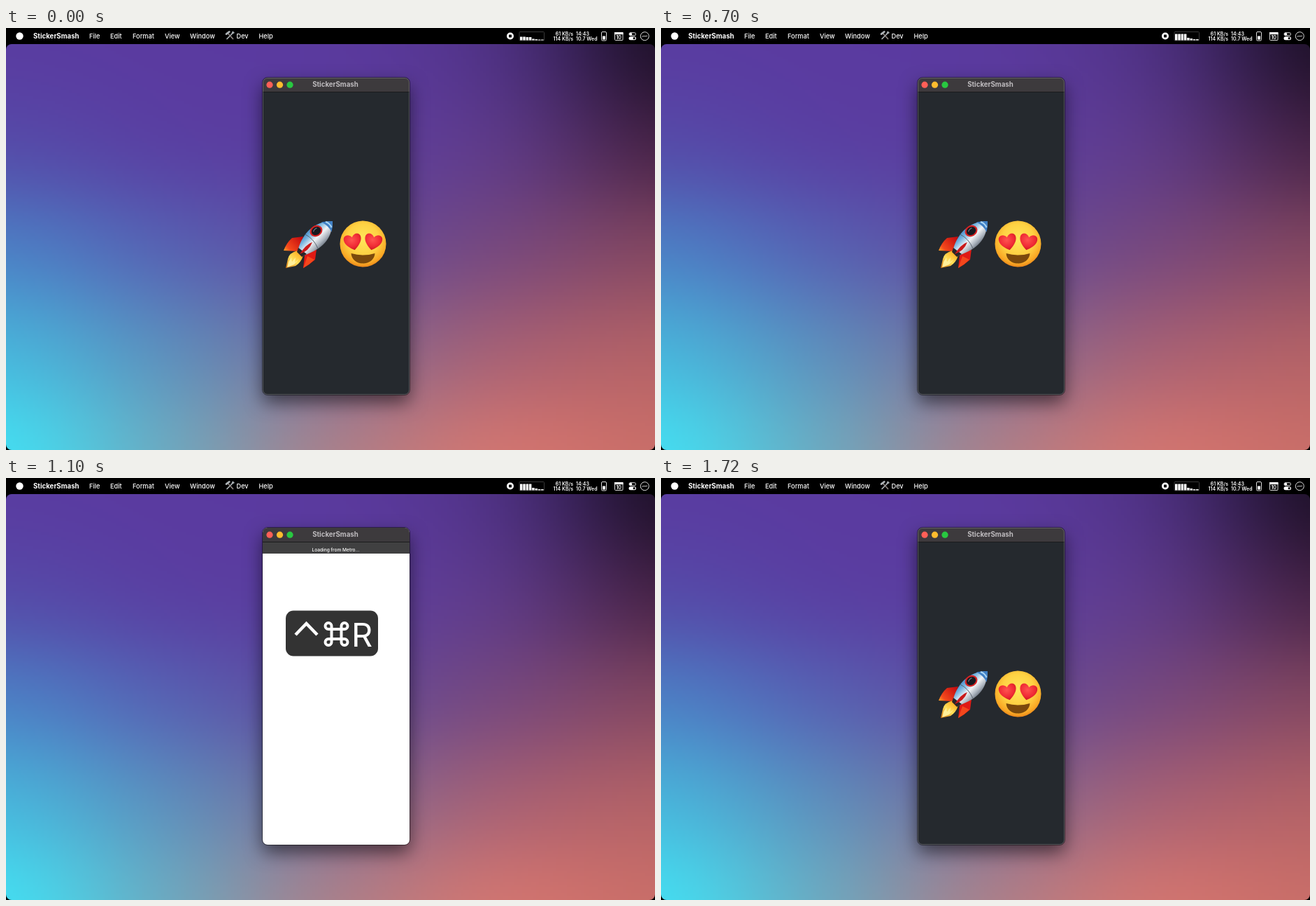
Write an HTML page with a canvas that moves like this. It is 928 px wide and 603 px high and loops after 1850 ms.

```html
<!DOCTYPE html>
<html lang="en">
<head>
<meta charset="utf-8">
<title>App reload</title>
<style>
  html, body { margin: 0; width: 100%; height: 100%; overflow: hidden; background: #000; }
  canvas { position: absolute; left: 0; top: 23px; width: 928px; height: 580px; border-radius: 8px; }
  svg { position: absolute; left: 0; top: 0; display: block; }
  text { font-family: Inter, Roboto, sans-serif; fill: #fff; }
  .menu text { font-size: 9.2px; font-weight: 500; }
  .menu .app { font-size: 9.7px; font-weight: 700; }
  .menu .stat { font-size: 7px; font-weight: 600; }
  #window { filter: drop-shadow(0 11px 13px rgba(0, 0, 0, .55)); }
</style>
</head>
<body>
<canvas id="wallpaper" width="232" height="145"></canvas>
<svg width="928" height="603" viewBox="0 0 928 603">
  <defs>
    <clipPath id="frame"><rect x="367" y="71" width="210" height="453" rx="7"/></clipPath>
    <clipPath id="content"><rect x="367" y="92" width="210" height="432"/></clipPath>
    <linearGradient id="metal" gradientUnits="userSpaceOnUse" x1="431" y1="288" x2="454" y2="311">
      <stop offset="0" stop-color="#3f86c4"/><stop offset=".25" stop-color="#78b5df"/>
      <stop offset=".55" stop-color="#f2f4f6"/><stop offset=".8" stop-color="#aeb6c0"/>
      <stop offset="1" stop-color="#69727e"/>
    </linearGradient>
    <linearGradient id="fin" gradientUnits="userSpaceOnUse" x1="398" y1="322" x2="422" y2="300">
      <stop offset="0" stop-color="#ffc02a"/><stop offset=".3" stop-color="#f5491c"/>
      <stop offset="1" stop-color="#c50d10"/>
    </linearGradient>
    <linearGradient id="flame" gradientUnits="userSpaceOnUse" x1="420" y1="320" x2="402" y2="343">
      <stop offset="0" stop-color="#ffa91c"/><stop offset=".5" stop-color="#ffe05a"/>
      <stop offset="1" stop-color="#d97912"/>
    </linearGradient>
    <radialGradient id="skin" cx=".5" cy=".4" r=".62">
      <stop offset="0" stop-color="#ffe65a"/><stop offset=".55" stop-color="#fed143"/>
      <stop offset=".85" stop-color="#f9a825"/><stop offset="1" stop-color="#e87d17"/>
    </radialGradient>
    <radialGradient id="love" cx=".45" cy=".35" r=".7">
      <stop offset="0" stop-color="#ff5350"/><stop offset=".6" stop-color="#f02b35"/>
      <stop offset="1" stop-color="#c4141f"/>
    </radialGradient>
    <path id="heart" d="M0 12.5C-5 9-12.5 3-12.5-4C-12.5-11-4-12.5 0-6C4-12.5 12.5-11 12.5-4C12.5 3 5 9 0 12.5Z" fill="url(#love)"/>
    <path id="loop" d="M-7-7h-4.5a4.5 4.5 0 1 1 4.5-4.5z"/>
  </defs>

  <g class="menu">
    <rect width="928" height="23"/>
    <circle cx="19.5" cy="11.5" r="5.2" fill="#fff"/>
    <rect id="devHighlight" x="303" y="3" width="55" height="17" rx="4" fill="#303030"/>
    <text class="app" x="39" y="14.6">StickerSmash</text>
    <g id="items"></g>
    <g fill="none" stroke="#aeb4b8" stroke-width="1.7" stroke-linecap="round">
      <path d="M316 15.5L323.5 8M324.5 5.3l-1.3 2.6 2.6-1.2"/>
      <path d="M324.5 15.5L317.5 8" stroke="#8d8580"/>
      <path d="M315 8.6l4.3-3.2" stroke-width="2.6"/>
    </g>
    <circle cx="721" cy="11.5" r="5" fill="#fff"/>
    <rect x="719" y="9.5" width="4" height="4" rx=".7"/>
    <rect x="734" y="5.5" width="35.5" height="12.5" rx="1" fill="none" stroke="#3a3a3a"/>
    <g id="bars" fill="#fff"></g>
    <g text-anchor="end">
      <text class="stat" x="811" y="11">61 KB/s</text>
      <text class="stat" x="811" y="17.6">114 KB/s</text>
    </g>
    <text class="stat" x="815" y="11">14:43</text>
    <text class="stat" x="815" y="17.6">10.7 Wed</text>
    <g fill="none" stroke="#ddd">
      <rect x="851.5" y="5.5" width="7" height="12.5" rx="1.5"/>
      <rect x="870.5" y="6.5" width="11.5" height="11" rx="1"/>
      <rect x="891" y="6.7" width="9.5" height="4" rx="2"/>
      <circle cx="913.3" cy="11.7" r="6"/>
      <path d="M909.5 12.2q2-.8 4-.5t3.5-.6"/>
    </g>
    <g fill="#fff">
      <rect x="853" y="11.5" width="4" height="5"/>
      <rect x="870" y="6" width="12.5" height="3.2"/>
      <rect x="890.5" y="12.2" width="10.5" height="5" rx="2.5"/>
      <circle cx="893.2" cy="8.7" r="2"/>
    </g>
    <circle cx="898.2" cy="14.7" r="1.6"/>
    <text class="stat" x="876.2" y="16.3" text-anchor="middle">10</text>
  </g>

  <g id="window">
    <g clip-path="url(#frame)">
      <rect id="page" x="367" y="71" width="210" height="453"/>
      <rect x="367" y="71" width="210" height="21" fill="#3d3a3d"/>
      <rect x="367" y="91" width="210" height="1" fill="#1b1b1c"/>
    </g>
  </g>
  <circle cx="377" cy="81.2" r="4.6" fill="#ff5f57"/>
  <circle cx="391.5" cy="81.2" r="4.6" fill="#febc2e"/>
  <circle cx="406" cy="81.2" r="4.6" fill="#28c840"/>
  <text x="471" y="84.3" text-anchor="middle" font-size="9.7" font-weight="700" style="fill:#bfbcbf">StickerSmash</text>

  <g id="stickers">
    <path d="M425 298L409 300Q401 307 397 318L417 319Z" fill="url(#fin)"/>
    <path d="M444 316L442 331Q434 338 425 343L427 325Z" fill="#e01a14"/>
    <path d="M431 326L441 331Q434 338 425 343Z" fill="#f4471c"/>
    <path d="M417 318Q405 321 403 330L400 343L414 340Q422 335 425 325Z" fill="url(#flame)"/>
    <path d="M404 334l4-6 1 6 5-6-1 7 6-5-7 8-10 4z" fill="#fff09a"/>
    <path d="M467 276C446 276 428 287 419 312L417 319L424 326L431 323C457 313 466 298 467 276Z" fill="url(#metal)"/>
    <path d="M467 276Q458 275.500 451 277.500Q461 282 465.500 291.500Q467.500 284 467 276Z" fill="#3f7fc4"/>
    <path d="M457 277q6 2 8.500 8" fill="none" stroke="#a8d3f2" stroke-width="2"/>
    <path d="M428 295Q440 301 446 315" fill="none" stroke="#59636e" stroke-width="1"/>
    <path d="M418 314L416 320L423 327L430 323Z" fill="#2c2528"/>
    <path d="M438 306Q429 309 420 323Q433 319 438 306Z" fill="#c9191a"/>
    <g transform="translate(443.500 290) rotate(-30)">
      <ellipse rx="9.300" ry="7.800" fill="#d62222"/>
      <ellipse rx="7" ry="5.700" fill="#17191f"/>
      <path d="M-4-1Q-1-4 3-3" fill="none" stroke="#65717d" stroke-width="1.300"/>
    </g>

    <circle cx="510.500" cy="308.500" r="33" fill="url(#skin)"/>
    <use href="#heart" transform="translate(496 305) rotate(-12)"/>
    <use href="#heart" transform="translate(525 305) rotate(12)"/>
    <path d="M493.500 322Q510.500 327 527.500 322C527 331 519 336.500 510.500 336.500S494 331 493.500 322Z" fill="#7c4a0c"/>
  </g>

  <g id="shortcut">
    <rect x="400" y="189.500" width="132" height="65" rx="11" fill-opacity=".8"/>
    <g fill="none" stroke="#fff" stroke-width="4">
      <path d="M414 224L429.500 208L445 224" stroke-width="4.500"/>
      <g transform="translate(472.500 223)">
        <rect x="-7" y="-7" width="14" height="14"/>
        <use href="#loop"/>
        <use href="#loop" transform="scale(-1 1)"/>
        <use href="#loop" transform="scale(1 -1)"/>
        <use href="#loop" transform="scale(-1)"/>
      </g>
    </g>
    <text x="494" y="240.500" font-size="47">R</text>
  </g>

  <g clip-path="url(#content)">
    <g id="banner">
      <rect x="367" y="76" width="210" height="32" fill="#404041"/>
      <text x="471.500" y="105" text-anchor="middle" font-size="6.600" font-weight="500">Loading from Metro...</text>
    </g>
  </g>
  <rect x="366.500" y="70.500" width="211" height="454" rx="7.500" fill="none" stroke="#000" stroke-opacity=".45"/>
  <rect id="rim" x="367.500" y="71.500" width="209" height="452" rx="6.500" fill="none" stroke="#fff" stroke-opacity=".2"/>
</svg>
<script>
const LOOP = 1850;
const $ = id => document.getElementById(id);
const show = (id, on) => $(id).setAttribute('visibility', on ? 'visible' : 'hidden');

// Wallpaper: colour anchors blended with gaussian weights.
function paintWallpaper() {
  const rows = [
    '5a3ba0 5a3aa0 5b3aa0 53348e 130a18',
    '554aa8 5a3ca0 5a3c9e 623e92 421e3e',
    '4a84c8 565fb4 604a9c 75477f 86485f',
    '46bade 5b8fbd 7b6c98 a85f73 b66365',
    '3decfc 6eaac0 b37f86 de796f c96e68'
  ];
  const anchors = rows.flatMap((row, j) => row.split(' ').map((hex, i) => ({
    x: i, y: j, rgb: [0, 2, 4].map(k => parseInt(hex.slice(k, k + 2), 16))
  })));
  const canvas = $('wallpaper'), ctx = canvas.getContext('2d');
  const { width, height } = canvas;
  const image = ctx.createImageData(width, height);
  for (let p = 0; p < width * height; p++) {
    const x = p % width / width * 4, y = Math.floor(p / width) / height * 4;
    const sum = [0, 0, 0];
    let total = 0;
    for (const a of anchors) {
      const w = Math.exp(-((x - a.x) ** 2 + (y - a.y) ** 2) * 1.75);
      total += w;
      a.rgb.forEach((v, k) => sum[k] += v * w);
    }
    image.data.set([...sum.map(v => v / total), 255], p * 4);
  }
  ctx.putImageData(image, 0, 0);
}

const menu = { File: 119, Edit: 149, Format: 181, View: 227, Window: 263, Dev: 329.5, Help: 361.5 };
$('items').innerHTML = Object.entries(menu)
  .map(([label, x]) => `<text x="${x}" y="14.5">${label}</text>`).join('');

const idleLoad = [5, 5, 4.5, 4.5, 2, 1.5, 1, 1];
const busyLoad = [9, 9, 9, 9, 3.5, 2.5, 1.5, 1.5];
$('bars').innerHTML = idleLoad.map((_, i) => `<rect x="${735 + i * 4.3}" width="3.5"/>`).join('');

function render(t) {
  const reloading = t >= 900 && t < 1200;
  const load = t < 700 ? idleLoad : busyLoad;
  [...$('bars').children].forEach((bar, i) => {
    bar.setAttribute('y', 17.5 - load[i]);
    bar.setAttribute('height', load[i]);
  });
  show('devHighlight', t >= 900 && t < 1000);
  $('page').setAttribute('fill', reloading ? '#fff' : '#25292e');
  show('stickers', !reloading);
  show('rim', !reloading);
  $('shortcut').setAttribute('opacity', t < 900 || t >= 1300 ? 0 : reloading ? 1 : .22);
  show('banner', t >= 1100 && t < 1600);
  $('banner').setAttribute('transform', `translate(0 ${t >= 1500 ? -8 : 0})`);
}

function tick(now) {
  render(now % LOOP);
  requestAnimationFrame(tick);
}
paintWallpaper();
render(0);
requestAnimationFrame(tick);
</script>
</body>
</html>
```
